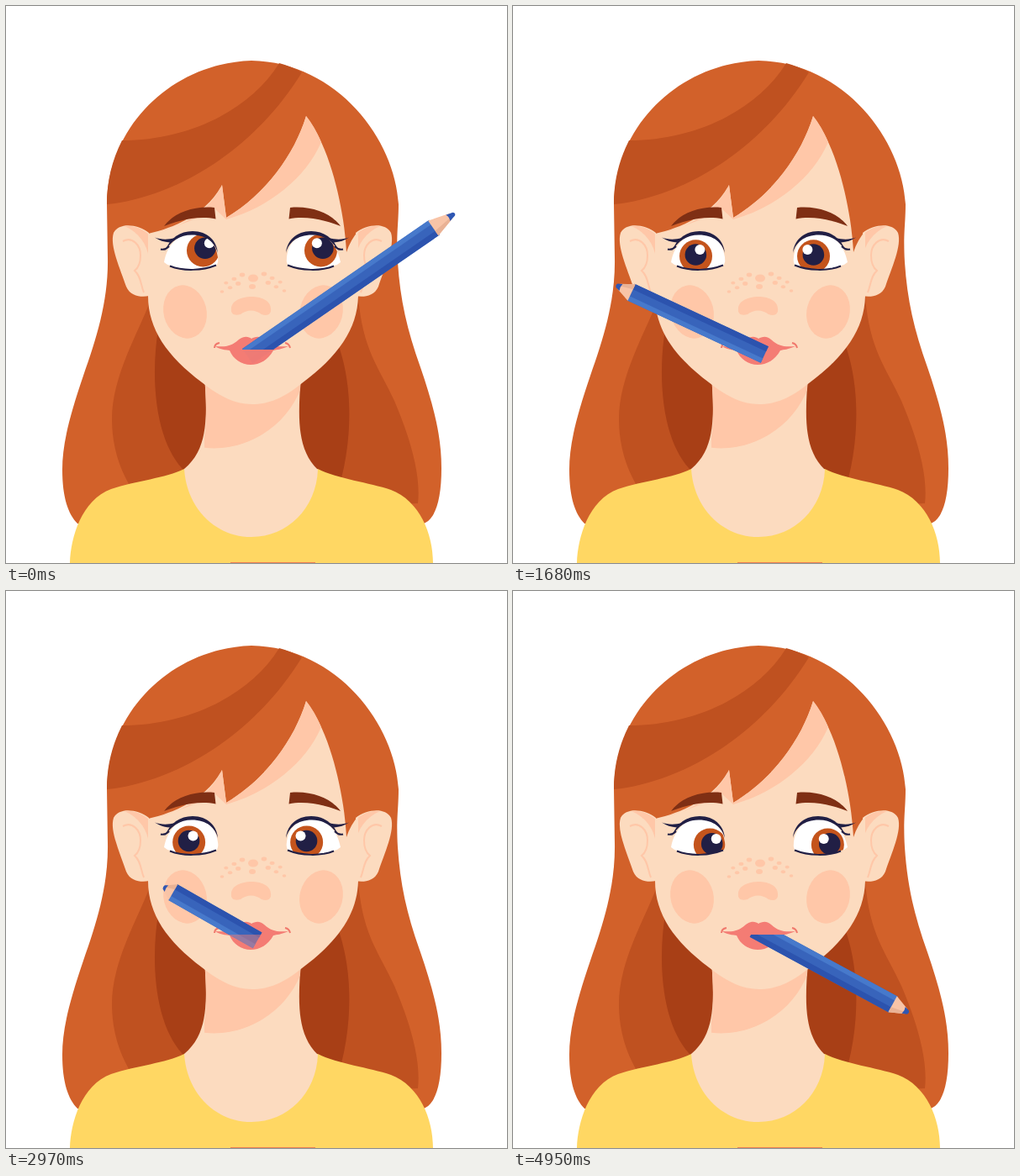
These frames come from a looping animation (596 by 663 pixels, 5430 ms). An HTML page:

```html
<!DOCTYPE html>
<html lang="en">
<head>
<meta charset="utf-8">
<title>Girl with pencil</title>
<style>
  html, body { margin: 0; width: 100%; height: 100%; overflow: hidden; background: #fff; }
  svg { display: block; width: 100vw; height: 100vh; }
  .hair { fill: #d2612a; }
  .shade { fill: #bf5120; }
  .deep { fill: #a83f16; }
  .skin { fill: #fcdbbf; }
  .blush { fill: #ffc7a8; }
  .navy { fill: #211f45; }
  .lips { fill: #f47c74; }
  .line { fill: none; stroke-width: 2; }
</style>
</head>
<body>
<svg viewBox="0 0 596 663" xmlns="http://www.w3.org/2000/svg">
  <defs>
    <path id="white" d="M188 305C192 284 205 271 222 271C239 271 250 282 252 299Q253 304 251 308C235 315 208 315 196 309Q191 308 188 305Z"/>
    <clipPath id="eyeL"><use href="#white"/></clipPath>
    <clipPath id="eyeR"><use href="#white" transform="matrix(-1 0 0 1 586 0)"/></clipPath>
    <clipPath id="above"><rect width="596" height="409"/></clipPath>
    <clipPath id="below"><rect y="409" width="596" height="254"/></clipPath>
    <clipPath id="neckClip"><path d="M236 440Q240 490 236 512L236 540H352Q347 490 351 440Z"/></clipPath>

    <g id="lid">
      <path class="navy" d="M189 292C195 276 207 268 222 268C240 268 251 280 252 294C249 282 239 272.5 221 272.5C207 272.5 196 280 189 292Z"/>
      <path class="navy" d="M177 275.5C184 278 192 278.5 201 276L195 281.5C188 281 182 279 177 275.5Z"/>
      <path class="line" d="M184 289.5Q189 291 194 286M195 309.5C211 316 234 315 250 308.5" stroke="#211f45"/>
    </g>
    <path id="brow" d="M188 262C199 247 222 237.5 248 240L249.5 253.5C230 249.5 209 254 188 262Z" fill="#7f2f14"/>
    <g id="ear">
      <path class="skin" d="M170 270C157 260 135 257 128 270C123 285 136 313 143 334C148 346 162 347 170 345Z"/>
      <path class="blush" d="M141 262C152 261 162 265 170 272V300C168 284 158 269 141 262Z"/>
      <path class="line" d="M139 280C150 274 160 284 160 297C160 306 157 312 153 315C161 322 160 332 164 341" stroke="#ffc7a8"/>
    </g>
    <ellipse id="cheek" class="blush" cx="213" cy="364" rx="25.5" ry="32" transform="rotate(-14 213 364)"/>

    <g id="pencil">
      <path fill="#3864bb" d="M0-10.8H90V10.8H0Z"/>
      <path fill="#4779cb" d="M0-10.8H90V-5H0Z"/>
      <path fill="#2c53ae" d="M0 4H90V10.8H0Z"/>
      <path fill="#f8c4a7" d="M89.5-10.8L98-3.5V3.5L89.5 10.8Z"/>
      <path fill="#e9b295" d="M89.5 4L97 1.4V4.2L89.5 10.8Z"/>
      <path fill="#2f57b3" d="M96.6-4.4L99.4-2.4Q100.4 0 99.4 2.4L96.6 4.4Q97.4 0 96.6-4.4Z"/>
    </g>
  </defs>

  <rect width="596" height="663" fill="#fff"/>
  <path class="hair" d="M292 65C200 68 122 140 120 235L121 300C122 350 108 395 92 440C75 490 67 522 67 552C67 585 74 605 85 616L140 640H450L499 615C512 608 518 585 518 550C518 510 508 474 493 430C477 385 469 350 466 305C464 270 467 260 467 236C463 160 395 67 292 65Z"/>
  <path class="shade" d="M172 350C158 388 126 440 126 492C126 525 136 554 150 575L292 600L490 592C494 556 479 510 462 470C444 430 424 410 419 345Z"/>
  <path class="deep" d="M181 385C172 440 176 520 214 555L300 570L399 562C411 515 413 455 396 405Z"/>

  <path fill="#ffd763" d="M76 663C77 632 90 588 125 575C155 565 190 562 212 551H371C395 563 432 567 458 576C492 589 508 628 508 663Z"/>
  <path class="skin" d="M236 440C240 490 240 528 212 551C215 598 249 632 292 632C335 632 369 598 371 552C346 528 347 490 351 440Z"/>
  <path class="blush" clip-path="url(#neckClip)" d="M230 440H355C345 492 290 535 230 525Z"/>
  <rect x="267" y="662" width="101" height="1" fill="#ee8152"/>

  <use href="#ear"/>
  <use href="#ear" transform="matrix(-1 0 0 1 586 0)"/>

  <path class="skin" d="M169 271C205 263 240 245 257 213L262 252C309 224 343 177 357 131C386 169 402 239 405 293Q410 278 419 268V345C418 385 395 417 352 449C330 467 312 474 293 474C274 474 257 467 233 448C192 417 169 385 169 345Z"/>
  <path class="blush" d="M257 213L262 252C309 224 343 177 357 131Q367 143 375 162C357 204 313 240 262 254L248 241Q225 256 180 269C211 262 242 244 257 213Z"/>
  <path class="shade" d="M325 68C290 125 215 160 138 160C126 184 120 208 120 236C192 229 290 180 352 79Q340 72 325 68Z"/>

  <use href="#cheek"/>
  <use href="#cheek" transform="matrix(-1 0 0 1 588 0)"/>
  <g id="freckles" class="blush"></g>
  <path class="blush" d="M268 360C269 342 314 341 315 360C316 368 310 369 304 367C296 361 287 361 279 367C272 369 267 367 268 360Z"/>

  <use href="#white" fill="#fff"/>
  <use href="#white" fill="#fff" transform="matrix(-1 0 0 1 586 0)"/>
  <g clip-path="url(#eyeL)" id="left"></g>
  <g clip-path="url(#eyeR)" id="right"></g>
  <use href="#lid"/>
  <use href="#lid" transform="matrix(-1 0 0 1 585 0)"/>
  <use href="#brow"/>
  <use href="#brow" transform="matrix(-1 0 0 1 586 0)"/>

  <path class="lips" d="M249 405C262 406 268 405 277 397C284 392 289 394 292 396C296 394 301 392 307 397C316 405 322 406 336 405C327 409 322 409 318 410C312 421 302 427 291 427C280 427 270 420 266 410C260 409 254 409 249 405Z"/>
  <path class="line" d="M254 401Q248 402 248 407M332 401Q337 402 338 407" stroke="#f0786c"/>

  <g clip-path="url(#above)"><use id="upper" href="#pencil"/></g>
  <g clip-path="url(#below)"><use id="lower" href="#pencil"/></g>
</svg>
<script>
const LOOP = 5430, STEP = 30, REST = 4950;
const el = id => document.getElementById(id);
const clamp = v => Math.max(0, Math.min(1, v));

// Turning points of the swing: time, heading in degrees, length
const SWING = [
  [0, 34.6, 300], [630, 96.8, 236], [1140, 134, 294], [1460, 119, 290],
  [1710, 160, 190], [2070, 208, 179], [2280, 217, 198], [2970, 150.3, 129],
  [3400, 104, 118], [3780, 60.5, 244], [4050, 50, 130], [4560, -20, 113],
  [REST, -28.5, 209.5]
];

// Slope through a key, flat at turning points so nothing overshoots
function slope(k, c) {
  const a = SWING[k - 1], b = SWING[k], d = SWING[k + 1];
  if (!a || !d) return 0;
  const s = (b[c] - a[c]) / (b[0] - a[0]);
  const r = (d[c] - b[c]) / (d[0] - b[0]);
  return s * r <= 0 ? 0 : 2 * s * r / (s + r);
}

function swing(t) {
  let k = 0;
  while (k < SWING.length - 2 && t >= SWING[k + 1][0]) k++;
  const a = SWING[k], b = SWING[k + 1], h = b[0] - a[0];
  const u = (t - a[0]) / h, v = 1 - u;
  return [1, 2].map(c =>
    v * v * (1 + 2 * u) * a[c] + u * u * (1 + 2 * v) * b[c]
      + h * u * v * (v * slope(k, c) - u * slope(k + 1, c)));
}

// Two freckles on the nose, the rest fanning out to both sides
function addFreckles() {
  const dot = (x, y, r) => `<ellipse cx="${x}" cy="${y}" rx="${r}" ry="${r * 0.75}"/>`;
  let dots = dot(294, 324, 6) + dot(293, 334, 4);
  for (let i = 0; i < 6; i++) {
    const dx = 12 + 4.8 * i, y = 320 + 2.4 * i + i % 2 * 8, r = 3.3 - 0.2 * i;
    dots += dot(293 - dx, y, r) + dot(295 + dx, y - 1, r);
  }
  el("freckles").innerHTML = dots;
}

function addIris(id, shine) {
  el(id).innerHTML = `<g><circle r="19.5" fill="#c4541c"/>
    <g><circle class="navy" r="12.8"/><circle cx="${shine}" cy="-6" r="6" fill="#fff"/></g></g>`;
}

function look(id, x, gx, gy) {
  const iris = el(id).firstElementChild;
  iris.setAttribute("transform", `translate(${x + gx} ${292 + gy})`);
  iris.lastElementChild.setAttribute("transform", `translate(${0.15 * gx} ${0.15 * gy - 2.5})`);
}

function draw(t) {
  const [angle, length] = swing(t);
  const cos = Math.cos(angle * Math.PI / 180), sin = Math.sin(angle * Math.PI / 180);
  const x = 293 - 7 * cos, y = 409 + 14 * sin;

  // The end inside the mouth fades as the pencil crosses the lips
  const seen = { upper: clamp(2.5 + 6 * sin - 0.95 * cos), lower: clamp(4 - 7 * sin) };
  for (const id in seen) {
    el(id).setAttribute("transform",
      `translate(${x} ${y}) rotate(${-angle}) scale(${length / 100} 1)`);
    el(id).setAttribute("opacity", seen[id]);
  }

  // The eyes follow the tip
  const gx = 7.5 + 8.5 * Math.tanh((x + length * cos - 330) / 60);
  const gy = 3 + 7 * Math.tanh((y - length * sin - 300) / 80);
  look("left", 218.5, gx, gy);
  look("right", 358.5, gx, gy);
}

function tick() {
  const t = performance.now() % LOOP;
  draw(Math.min(REST, Math.floor(t / STEP) * STEP));
  requestAnimationFrame(tick);
}

addFreckles();
addIris("left", 5);
addIris("right", -7);
tick();
</script>
</body>
</html>
```
